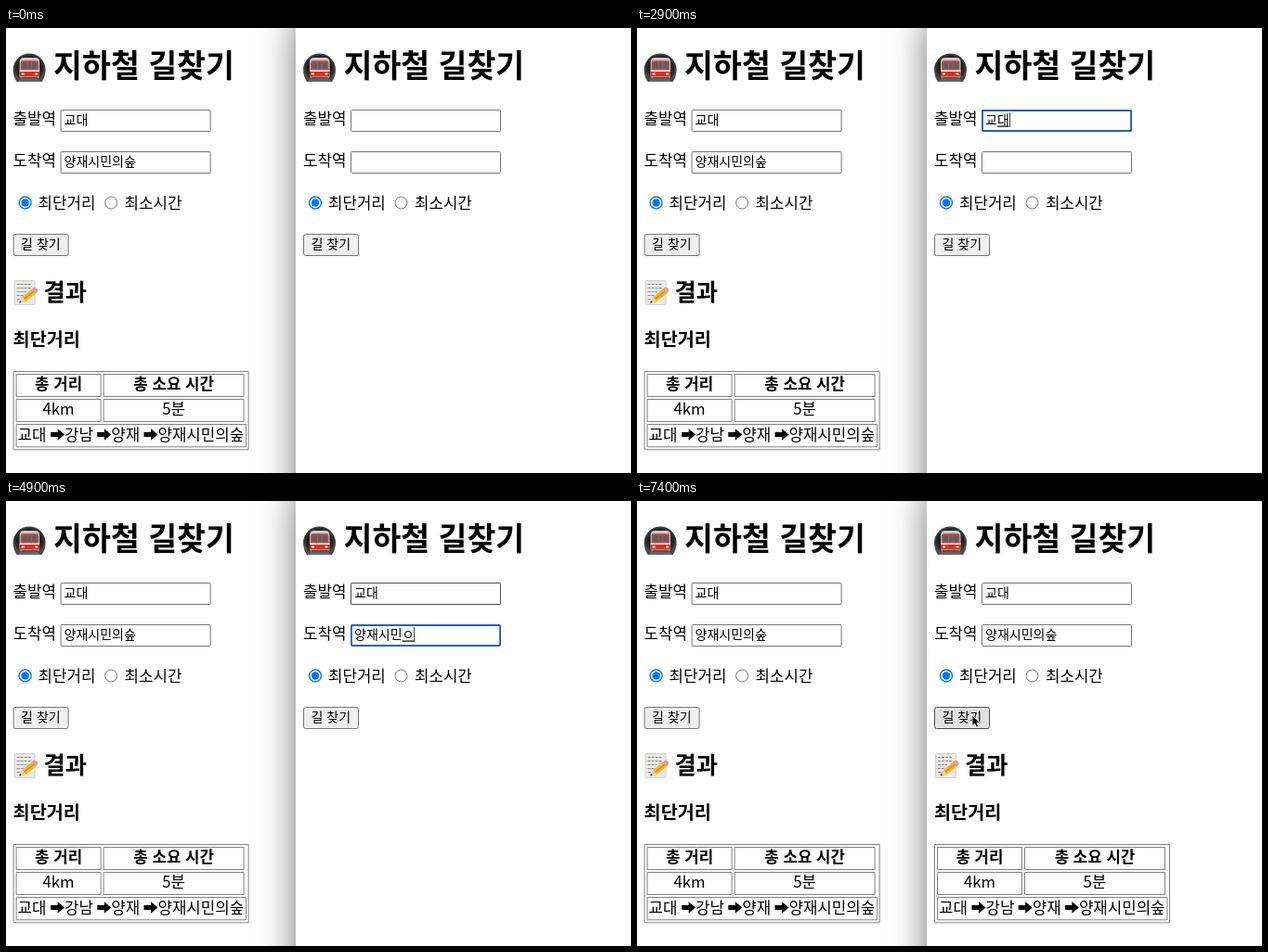
An HTML page that plays this animation: 673x480 px, repeating every 8 s.

```html
<!DOCTYPE html>
<html lang="ko">
<head>
<meta charset="utf-8">
<title>지하철 길찾기</title>
<style>
html, body { margin: 0; width: 100%; height: 100%; overflow: hidden; background: #fff; }
svg { display: block; width: 673px; height: 480px; }
text { font: 500 16.8px "Noto Sans CJK KR", "Noto Sans", sans-serif; fill: #000; stroke: none; white-space: pre; }
text.field { font-size: 14px; }
text.h1 { font-size: 33.6px; font-weight: 700; }
text.h2 { font-size: 25.2px; font-weight: 700; }
text.h3 { font-size: 19.66px; font-weight: 700; }
text.mid { text-anchor: middle; }
text.th { font-weight: 700; }
#window { filter: drop-shadow(0 20px 19px rgba(0, 0, 0, .55)); }
.idle { fill: #efefef; stroke: #767676; }
.hover { fill: #e1e1e1; stroke: #4f4f4f; }
.active { fill: #f5f5f5; stroke: #8d8d8d; }
</style>
</head>
<body>
<svg viewBox="0 0 673 480">
  <defs>
    <radialGradient id="tunnel">
      <stop offset=".55" stop-color="#111"/><stop offset=".85" stop-color="#2b2b2b"/><stop offset="1" stop-color="#4a4a4a"/>
    </radialGradient>

    <rect id="box" x="59.5" y="88.5" width="161" height="23" rx="1"/>

    <g id="button">
      <rect x="8.5" y="222.5" width="59" height="23" rx="2"/>
      <text class="field" x="16.5" y="238">길 찾기</text>
    </g>

    <g id="train">
      <path d="M12 58Q8 52 8 45A17.5 17.5 0 0 1 43 45Q43 52 39 58Z" fill="url(#tunnel)"/>
      <path d="M13 58L17 53H34L38 58Z" fill="#666"/>
      <path d="M15 52V37Q15 32 20 32H31.500Q36.500 32 36.500 37V52Q36.500 54 34 54H17.500Q15 54 15 52Z" fill="#c9cdd0"/>
      <path d="M16 47V38Q16 35 19 35H32.500Q35.500 35 35.500 38V47Z" fill="#d4473c"/>
      <path d="M17.500 37H23V44H17.500ZM24 37H27.500V44H24ZM28.500 37H34V44H28.500Z" fill="#52616d"/>
      <path d="M15 45.500H36.500V47H15Z" fill="#eee"/>
      <path d="M15 47H36.500V52.500H15Z" fill="#d92f25"/>
      <path d="M17 48.500H20V50.500H17ZM31.500 48.500H34.500V50.500H31.500Z" fill="#fff3c0"/>
      <path d="M17 53H34.500V55H17Z" fill="#555"/>
    </g>

    <g id="memo">
      <rect x="9.500" y="272.500" width="22" height="26" rx="1" fill="#e9e9e7" stroke="#d0d0ce"/>
      <path d="M12 276.500H28M12 280.500H27M12 284.500H22M12 288.500H19M12 292.500H16" stroke="#8b8b8b" stroke-width="1.200" stroke-dasharray="3 1"/>
      <path d="M14.500 296.500L18 290L29 281L33 286L21.500 295Z" fill="#f4b62c"/>
      <path d="M19.800 292.500L31 283.500" stroke="#d18a16" stroke-width="1.200"/>
      <path d="M28 281.800L30 280Q32.500 279 34.200 281.500Q35.500 284 32.200 286.700Z" fill="#e59a94"/>
      <path d="M14.500 296.500L18 290L21.500 295Z" fill="#ecd0a0"/>
      <path d="M14.500 296.500L15.700 294.200L17.200 295.900Z" fill="#333"/>
    </g>

    <g id="form">
      <use href="#train"/>
      <text class="h1" x="51.500" y="53.200">지하철 길찾기</text>
      <text x="8" y="104">출발역</text>
      <text x="8" y="149">도착역</text>
      <g fill="#fff" stroke="#767676">
        <use href="#box"/><use href="#box" y="45"/>
        <circle cx="113.500" cy="188.500" r="6.500"/>
        <circle cx="21" cy="188.500" r="6.500" stroke="#0075ff" stroke-width="1.400"/>
      </g>
      <circle cx="21" cy="188.500" r="4.200" fill="#0075ff"/>
      <text x="35" y="194.500">최단거리</text>
      <text x="128" y="194.500">최소시간</text>
    </g>

    <path id="arrow" d="M48.500 436H56V432.300L63.500 438.500L56 444.700V441H48.500Z"/>

    <g id="result">
      <use href="#memo"/>
      <text class="h2" x="41" y="294">결과</text>
      <text class="h3" x="8" y="343">최단거리</text>
      <path fill="none" stroke="#808080" d="M8.500 370.500H261.500V454.800H8.500Z
        M11.500 373.500H102.500V397.500H11.500Z M105.500 373.500H256.500V397.500H105.500Z
        M11.500 400.500H102.500V424.500H11.500Z M105.500 400.500H256.500V424.500H105.500Z
        M11.500 427.500H259V451.800H11.500Z"/>
      <text class="mid th" x="57" y="390">총 거리</text>
      <text class="mid th" x="181" y="390">총 소요 시간</text>
      <text class="mid" x="57" y="417">4km</text>
      <text class="mid" x="181" y="417">5분</text>
      <text x="13" y="444.500">교대</text><use href="#arrow"/>
      <text x="63.500" y="444.500">강남</text><use href="#arrow" x="50.200"/>
      <text x="113.700" y="444.500">양재</text><use href="#arrow" x="100.400"/>
      <text x="163.900" y="444.500">양재시민의숲</text>
    </g>
  </defs>

  <g transform="translate(-.4)">
    <use href="#form"/>
    <use href="#button" class="idle"/>
    <use href="#result"/>
    <text class="field" x="63" y="104">교대</text>
    <text class="field" x="63" y="149">양재시민의숲</text>
  </g>

  <rect id="window" x="312" y="-30" width="500" height="580" fill="#fff"/>
  <g transform="translate(312)">
    <use href="#form"/>
    <use href="#button" id="submit"/>
    <use href="#result" id="answer"/>
    <use href="#box" id="hoverBox" fill="none" stroke="#4f4f4f"/>
    <rect id="focusRing" x="60" y="89" width="160" height="22" rx="1.500" fill="none" stroke="#1a62cc" stroke-width="1.800"/>
    <text class="field" id="from" x="63" y="104"></text>
    <text class="field" id="to" x="63" y="149"></text>
    <path id="spelling" d="M64 152.500H127" stroke="#f0302c" stroke-width="1.900" stroke-dasharray="0 2.800" stroke-linecap="round"/>
    <rect id="compose" width="12.500" height="1.200"/>
    <rect id="caret" width="1" height="16" fill="#444"/>
  </g>
  <path id="pointer" d="M0 0V11.500L2.700 9L4.500 13L6.600 12.100L4.900 8.200H8.400Z" fill="#000" stroke="#fff" stroke-width=".8"/>
  <path id="beam" d="M-3 -6Q0 -6 0 -4Q0 -6 3 -6M0 -4.500V4.500M-3 6Q0 6 0 4Q0 6 3 6M-1.500 2H1.500" fill="none" stroke="#222" stroke-width="1.100"/>
</svg>
<script>
const LOOP = 8000, STEP = 100, CHAR = 14 * 0.92;
const $ = id => document.getElementById(id);
const show = (id, on) => $(id).style.display = on ? "" : "none";

// Each entry: [time, value], held until the next one.
const fromKeys = [[0, ""], [2000, "ㄱ"], [2200, "교"], [2800, "굗"], [2900, "교대"]];
const toKeys = [[0, ""], [3800, "ㅇ"],
  ..."야 양 양ㅈ 양재 양잿 양재시 양재심 양재시미 양재시민 양재시민ㅇ 양재시민으".split(" ").map((s, i) => [4000 + i * STEP, s]),
  [5200, "양재시민의"], [5300, "양재시민읫"], [5400, "양재시민의수"], [5600, "양재시민의숲"]];
const held = (keys, t) => keys.filter(k => k[0] <= t).pop()[1];

const FOCUS_FROM = 1600, FOCUS_TO = 3100, PRESS = 7000, ANSWER = 7100;

const easeOut = p => 1 - (1 - p) ** 2;
const smooth = p => p * p * (3 - 2 * p);
const progress = (t, a, b) => Math.min(1, Math.max(0, (t - a) / (b - a)));

function mouseAt(t) {
  if (t < 6100) {
    const p = easeOut(progress(t, 900, 1400));
    return [577 - 93 * p, 5 + 92.5 * p];
  }
  const p = smooth(progress(t, 6100, 6800));
  return [484 - 123 * p, 97.5 + 133.5 * p];
}

function draw(t) {
  const [x, y] = mouseAt(t);
  const inField = top => x > 371 && x < 533 && y > top && y < top + 24;
  const onButton = t > 6100 && x < 380 && y > 222;
  const visible = (t >= 900 && t < 2000) || (t >= FOCUS_TO && t < 4300) || t >= 6100;
  const beam = inField(88) || inField(133);
  const at = `translate(${x} ${y})`;
  $("pointer").setAttribute("transform", at);
  $("beam").setAttribute("transform", at);
  show("pointer", visible && !beam);
  show("beam", visible && beam);

  const second = t >= FOCUS_TO;
  const focused = t >= FOCUS_FROM && t < PRESS;
  const shift = second ? 45 : 0;
  const from = held(fromKeys, t), to = held(toKeys, t);
  const typed = (second ? to : from).length;
  const end = 63 + typed * CHAR;

  $("from").textContent = from;
  $("to").textContent = to;
  show("hoverBox", t >= 900 && inField(88));
  show("focusRing", focused);
  $("focusRing").setAttribute("y", 89 + shift);
  show("caret", focused && !(t >= 3600 && t < 3800));
  $("caret").setAttribute("x", Math.round(end));
  $("caret").setAttribute("y", 91 + shift);
  show("compose", focused && typed > 0);
  $("compose").setAttribute("x", end - CHAR);
  $("compose").setAttribute("y", 105.5 + shift);
  show("spelling", t >= 6500 && t < PRESS);

  $("submit").setAttribute("class", !onButton ? "idle" : t >= PRESS && t < ANSWER ? "active" : "hover");
  show("answer", t >= ANSWER);
}

const start = performance.now();
function tick() {
  const t = (performance.now() - start) % LOOP;
  draw(Math.floor(t / STEP) * STEP);
  requestAnimationFrame(tick);
}
tick();
</script>
</body>
</html>
```
